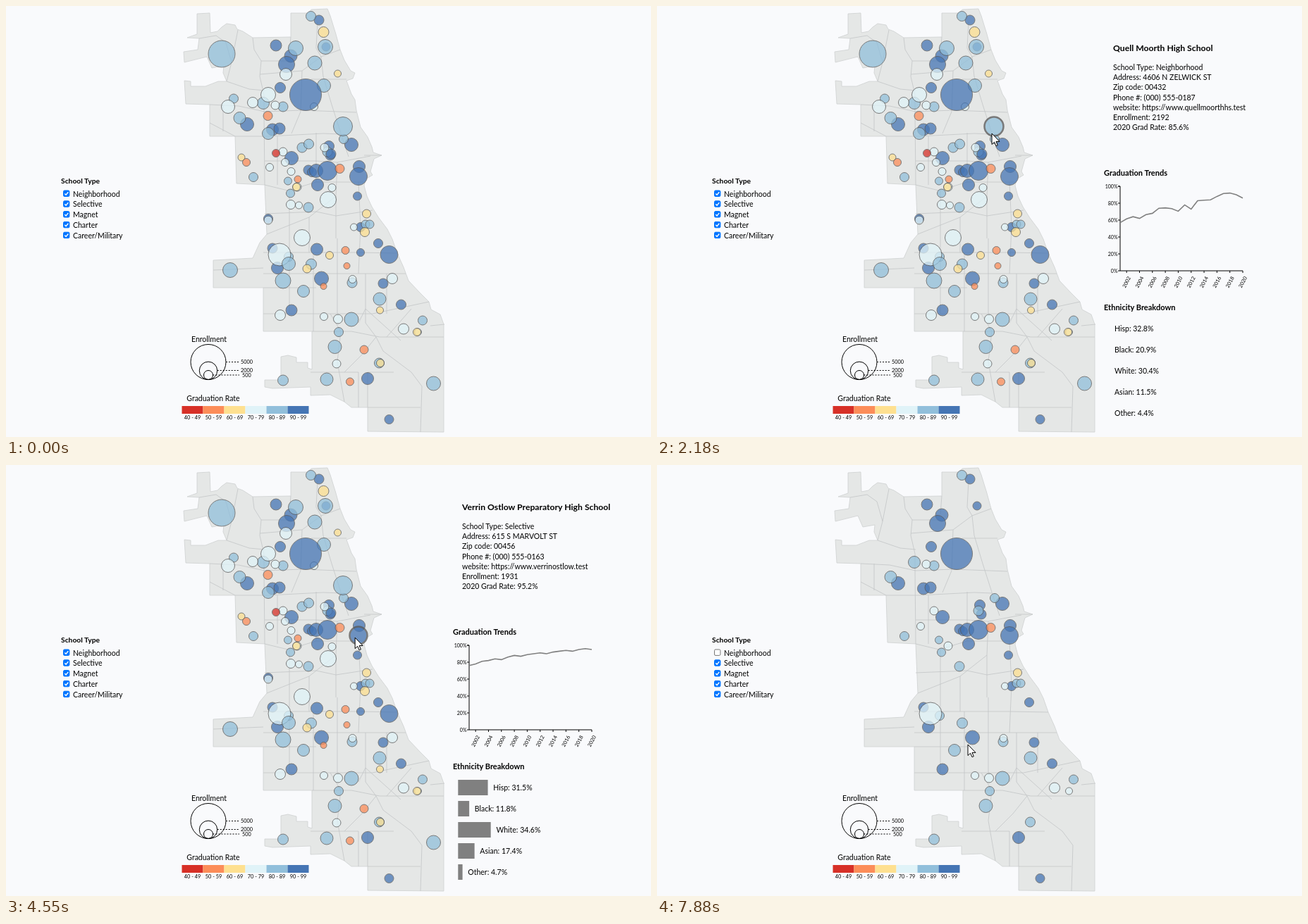
These frames come from a looping animation (915 by 612 pixels, 8 s). An HTML page:

```html
<!DOCTYPE html>
<html lang="en">
<head>
<meta charset="utf-8">
<title>School map</title>
<style>
html, body { margin: 0; width: 100%; height: 100%; overflow: hidden; background: #f9fafc; }
svg { display: block; width: 100%; height: 100%; font: 10.5px Lato, sans-serif; fill: #000; }
.land { fill: #e5e7e6; stroke: #cfd1d1; stroke-width: .8; }
.areas { fill: none; stroke: #c3c6c7; stroke-width: .8; }
.school { stroke: #555; stroke-width: 1; }
.line { fill: none; stroke: #000; }
.b { font-weight: 700; }
.tiny { font-size: 7.3px; }
</style>
</head>
<body>
<svg id="stage" viewBox="0 0 915 612">
  <path class="land" d="M271,11 289,10 290,38 300,36 306,30 313,25 325,27 328,33 336,36 350,45 404,44V10H429L433,5 456,4 460,14 468,40 474,62 480,77 489,92 495,95 492,103 483,106 490,125 495,133 497,148 503,172 513,186 519,200 521,208 533,212 522,217 517,235 520,240 510,246 508,255 512,270 519,285 529,301 541,317 548,331 555,351 564,371 571,390 587,407 600,420 603,431 616,438 621,452V605L513,604V570H490L480,562 460,552 432,553V541L378,543 367,541V531H390V498L400,496 412,499V506H428V514L434,516V462H365V400H294V361L350,358 360,336 370,324 367,254 327,252 325,185H289V140L255,139 253,106 262,107V114H283L301,107H313L308,95 309,85 292,88 285,72 253,80 252,65 272,62 274,46 257,45 271,40Z"/>
  <g class="areas" id="areas"></g>
  <g id="schools"></g>
  <g id="filters"></g>
  <g id="legend"></g>
  <g id="panel"></g>
  <path id="cursor" d="M0,0V15.5L3.6,12.2 6,17.7 8.3,16.7 6,11.4H11Z" fill="#fff" stroke="#000"/>
</svg>
<script>
const NS = 'http://www.w3.org/2000/svg', LOOP = 8000;
const $ = id => document.getElementById(id);

function add(parent, tag, attrs = {}, text) {
  const el = document.createElementNS(NS, tag);
  for (const k in attrs) el.setAttribute(k, attrs[k]);
  if (text !== undefined) el.textContent = text;
  return parent.appendChild(el);
}
const label = (g, x, y, text, more = {}) => add(g, 'text', { x, y, ...more }, text);
const clamp = v => Math.max(0, Math.min(1, v));
const cubic = v => (v = clamp(v)) < .5 ? 4 * v ** 3 : 1 - (2 - 2 * v) ** 3 / 2;
const smooth = v => v * v * (3 - 2 * v);

// Community borders
[
  'M350,45 352,62 362,78 360,100 366,126V150L367,254', 'M404,44 402,70', 'M329,34 320,80 313,107 345,118 367,120',
  'M274,46 298,42 312,52 320,80', 'M360,97 420,92 447,72 474,62', 'M442,22 440,60 447,72 450,100 462,140 478,190 486,214',
  'M289,140 330,142 367,150 420,148 497,151', 'M325,185H372L450,181 475,182', 'M308,140V178', 'M289,166 325,185',
  'M420,92 418,150 405,181', 'M433,104H483', 'M362,78H402', 'M367,220H440L470,222 517,213', 'M440,180V250', 'M385,185V254',
  'M367,254 400,262 440,250 508,250', 'M470,222 468,270V330', 'M367,295 440,292 468,298 520,290', 'M370,324 430,300 468,270',
  'M402,262V380', 'M430,300V350', 'M365,350H500L555,351', 'M500,250 503,312 500,380', 'M470,330V437', 'M365,380H567',
  'M294,375 365,372', 'M365,400H440', 'M402,380V437', 'M436,350V462', 'M365,437H520L600,420', 'M510,380V450', 'M540,380V437',
  'M434,462H490L530,470H621', 'M460,437 475,462 470,505 480,562', 'M510,450 525,470 535,490 575,520 590,540 588,605',
  'M432,520H500V570', 'M513,570H588', 'M513,570V520H550', 'M540,470 575,430', 'M500,450 510,430 560,475',
  'M480,520 505,495 525,470', 'M602,454 622,452', 'M508,212H533'
].forEach(d => add($('areas'), 'path', { d }));

// Schools: x, y, radius triples by graduation rate
const RATE = { red: '#d73027', orange: '#fc8d59', yellow: '#fee090', pale: '#e0f3f8', light: '#91bfdb', navy: '#4575b4' };
const citywide = {
  navy: [444,20,7, 383,56,8, 404,71,9, 398,83,11.5, 454,58,6, 389,116,7.5, 342,168,9.5, 378,175.5,8.5, 388,174,8,
    458,199,7.5, 490,197,9.5, 460,212,7, 405,216,9.5, 429,233,7, 434,236,6.5, 440,234,9.5, 456,234,13.5, 442,254,8.5,
    501,228,8.5, 500,242,12.5, 498.5,270,6, 503,314,6.5, 528,337,6.5, 378,344,7, 385,372,8.5, 447.5,387,10, 535,394,7,
    560.5,424,7, 405,432,8, 513,529,8.5, 543.5,587,6.5],
  light: [432.5,14.5,7, 365,138,8.5, 393,143,7, 331.5,159,8.5, 479,189,6.5, 456,207,7, 351,243,6.5, 400,248.5,5.5,
    403.5,266,6, 429,286,7, 510,310,6, 516,310,6, 401,356,6.5, 433,366.5,7.5, 422,405,8.5, 491,393,7, 530,416,9,
    490,445,10, 591,446.5,6.5, 472,463,6.5, 466.5,484,9.5, 529.5,507,7, 393,531.5,7.5],
  pale: [382,141,6, 393,207,6, 374,229,5.5, 413,257,6, 493.5,314,5, 388,353,16, 491.5,388,5.5, 451,441,5.5,
    471,444.5,6.5, 564,458.5,7.5, 584.5,463,5],
  yellow: [511.5,295,6], orange: [473.5,231,6.5]
};
const neighborhood = {
  light: [306,68,19, 411,60,10.5, 453,58,10.5, 438,81,10, 451,113,9.5, 323,131.5,6.5, 478,171,13.5, 372,181,8.5,
    420,201,7, 429.5,196,7, 318,375,10.5, 401,366,9.5, 393,390,11, 455,530,9, 606.5,536,10],
  navy: [461,210,7, 372,302,6.5, 441,345.5,8.5, 503,350,5.5, 543.5,353,12.5],
  pale: [397,97,8.5, 372,126,10.5, 315,143,9.5, 350,137,7.5, 437,143,5.5, 452,201,6, 396,222,5.5, 404.5,235,5.5,
    462.5,258,5.5, 457,275,11.5, 404,282,6.5, 415.5,283,5, 372,304,6, 420,329,11.5, 548,387,7.5, 389,439,7.5, 469,508,6],
  yellow: [450.5,37,7.5, 470.5,96,5, 334,215,5, 412,257,5.5, 509,321,6.5, 459,354,5.5, 427,373,6, 530.5,432,5,
    583,463,5.5, 531,507,5.5],
  orange: [371.5,156,6.5, 341,222,5.5, 414,246,5, 481.5,347,5.5, 483.5,369,4.5, 450.5,398,4.5, 508,488,6, 488,533.5,5.5],
  red: [383,209,5.5]
};
function plot(groups) {
  const dots = [];
  for (const rate in groups) {
    const list = groups[rate];
    for (let i = 0; i < list.length; i += 3) {
      const [x, y, r] = list.slice(i, i + 3);
      const el = add($('schools'), 'circle', { class: 'school', cx: x, cy: y, r, fill: RATE[rate], opacity: .75 });
      dots.push({ x, y, r, el });
    }
  }
  return dots;
}
const fixed = plot(citywide), locals = plot(neighborhood);
const dots = [...fixed, ...locals, ...plot({ navy: [425, 126, 22.5] })];

// Filters
const filters = $('filters');
label(filters, 78, 252, 'School Type', { class: 'b', 'font-size': 10.3 });
const boxes = ['Neighborhood', 'Selective', 'Magnet', 'Charter', 'Career/Military'].map((name, i) => {
  const y = 262 + i * 14.8;
  label(filters, 95, y + 8.6, name);
  const box = add(filters, 'rect', { x: 81.5, y: y, width: 8.4, height: 8.4, rx: 1.5, fill: '#0075ff', stroke: '#0075ff' });
  const tick = add(filters, 'path', { d: `M83.3,${y + 4.4}l1.8,1.9 3.2,-4`, fill: 'none', stroke: '#fff', 'stroke-width': 1.4 });
  return { box, tick };
});

// Legends
const legend = $('legend');
label(legend, 288, 477, 'Enrollment', { 'text-anchor': 'middle' });
[[25, 5000, 333, 505.5], [12.7, 2000, 333, 517.5], [6.5, 500, 335, 524]].forEach(([r, n, x, y]) => {
  add(legend, 'circle', { class: 'line', cx: 287, cy: 530.5 - r, r });
  add(legend, 'path', { class: 'line', d: `M${287 + r},${y}H331`, 'stroke-dasharray': '2 2' });
  label(legend, x, y + 2.6, n, { class: 'tiny' });
});
label(legend, 294, 561, 'Graduation Rate', { 'text-anchor': 'middle' });
Object.values(RATE).forEach((fill, i) => {
  add(legend, 'rect', { x: 249.5 + 30 * i, y: 568, width: 30, height: 11, fill });
  label(legend, 264.5 + 30 * i, 587, `${40 + 10 * i} - ${49 + 10 * i}`, { class: 'tiny', 'text-anchor': 'middle' });
});

// Detail panel
const schools = [
  { name: 'Osbert V Dorn Technical High School',
    info: ['Selective', '3718 W TELVORN ST', '00417', '(000) 555-0142', 'https://dornvoc.test', 4500, '96.9%'],
    trend: [86.5, 82.5, 82.5, 83, 84, 86, 92, 89, 93, 92.5, 92.5, 91.5, 93.5, 96, 95.5, 96.5, 96.2, 97.3, 97, 97],
    mix: [38.7, 7.5, 39.3, 10.3, 4.2] },
  { name: 'Quell Moorth High School',
    info: ['Neighborhood', '4606 N ZELWICK ST', '00432', '(000) 555-0187', 'https://www.quellmoorthhs.test', 2192, '85.6%'],
    trend: [57, 61.5, 64, 62, 66.5, 68, 74, 74.5, 73.5, 70.5, 78, 73, 83, 83.5, 84, 88, 91.5, 92, 90, 86],
    mix: [32.8, 20.9, 30.4, 11.5, 4.4] },
  { name: 'Verrin Ostlow Preparatory High School',
    info: ['Selective', '615 S MARVOLT ST', '00456', '(000) 555-0163', 'https://www.verrinostlow.test', 1931, '95.2%'],
    trend: [76, 78, 81, 82, 84, 83, 86, 88, 87, 89, 90, 91, 90, 92, 93, 94, 93, 95, 96, 95],
    mix: [31.5, 11.8, 34.6, 17.4, 4.7] },
  { name: 'Tamsel Corvane Academy High School',
    info: ['Charter', '5209 S DRELLING AVE', '00471', '(000) 555-0119', 'https://tamselcorvane.test', 842, '91.4%'],
    trend: [62, 64, 63, 67, 69, 72, 71, 75, 78, 77, 80, 82, 83, 85, 84, 87, 89, 90, 92, 91],
    mix: [82.1, 12.6, 3.2, .8, 1.3] }
];
const FIELDS = ['School Type', 'Address', 'Zip code', 'Phone #', 'website', 'Enrollment', '2020 Grad Rate'];
const GROUPS = ['Hisp', 'Black', 'White', 'Asian', 'Other'];
const panel = $('panel');
const yearX = i => 657 + i * 174 / 19, rateY = p => 376 - p * 1.2;
const title = label(panel, 647, 63.5, '', { class: 'b', 'font-size': 12.2 });
const info = FIELDS.map((_, i) => label(panel, 647, 91 + i * 14.2, ''));
label(panel, 634, 240.5, 'Graduation Trends', { class: 'b', 'font-size': 11 });
label(panel, 634, 431.5, 'Ethnicity Breakdown', { class: 'b', 'font-size': 11 });
add(panel, 'path', { class: 'line', d: 'M654,256H657V376H831' });
for (let p = 0; p <= 100; p += 20) {
  add(panel, 'path', { class: 'line', d: `M654,${rateY(p)}h3` });
  label(panel, 653.5, rateY(p) + 2.5, p + '%', { 'font-size': 7, 'text-anchor': 'end' });
}
for (let i = 1; i < 20; i += 2) {
  add(panel, 'path', { class: 'line', d: `M${yearX(i)},376v3` });
  label(panel, 0, 2.5, 2001 + i, { class: 'tiny', 'text-anchor': 'middle', transform: `translate(${yearX(i)} 392) rotate(-62)` });
}
const trend = add(panel, 'path', { fill: 'none', stroke: '#808080', 'stroke-width': 1.6 });
const bars = GROUPS.map((_, i) => ({
  rect: add(panel, 'rect', { x: 641.3, y: 447 + 30 * i, height: 22, fill: '#808080' }),
  text: label(panel, 649, 462 + 30 * i, '')
}));

let shown = -1;
function fillPanel(n) {
  if (n === shown) return;
  shown = n;
  const s = schools[n];
  title.textContent = s.name;
  info.forEach((el, i) => el.textContent = `${FIELDS[i]}: ${s.info[i]}`);
  trend.setAttribute('d', 'M' + s.trend.map((p, i) => `${yearX(i)},${rateY(p)}`).join(' '));
  bars.forEach((b, i) => b.text.textContent = `${GROUPS[i]}: ${s.mix[i]}%`);
}

// Timeline (ms)
const hovers = [
  { from: 600, to: 2060, grow: 655, x: 425, y: 126 },
  { from: 2160, to: 4060, grow: 2415, x: 478, y: 171 },
  { from: 4190, to: 5600, grow: 4200, x: 500, y: 242 },
  { from: 7690, to: 7740, grow: 7690, x: 385, y: 372 }
];
hovers.forEach(h => h.dot = dots.find(d => d.x === h.x && d.y === h.y));
const moves = [
  [30, 560, 300], [600, 430, 135], [820, 418, 128], [2030, 418, 128], [2180, 475, 181], [2790, 476, 176], [4010, 476, 176],
  [4140, 488, 238], [4200, 492, 242], [4700, 496, 246], [5580, 496, 246], [5620, 464, 246], [6410, 97, 270], [6600, 87, 268],
  [7270, 87, 268], [7880, 441, 397], [LOOP, 441, 397]
];
const UNCHECK = 6952;

function pointer(t) {
  const i = moves.findIndex(m => m[0] > t);
  const [t0, x0, y0] = moves[i - 1], [t1, x1, y1] = moves[i];
  const k = smooth((t - t0) / (t1 - t0));
  return [x0 + (x1 - x0) * k, y0 + (y1 - y0) * k];
}

function render(t) {
  const inside = t >= 30;
  $('cursor').style.display = inside ? '' : 'none';
  if (inside) $('cursor').setAttribute('transform', `translate(${pointer(t)})`);

  const active = hovers.findIndex(h => t >= h.from && t < h.to);
  hovers.forEach((h, i) => h.dot.el.style.strokeWidth = i === active ? 2.5 : 1);
  panel.style.display = active < 0 ? 'none' : '';
  if (active >= 0) {
    fillPanel(active);
    const k = cubic((t - hovers[active].grow) / 500);
    bars.forEach((b, i) => {
      const w = schools[active].mix[i] * 1.5 * k;
      b.rect.setAttribute('width', w);
      b.text.setAttribute('x', 649 + w);
    });
  }

  const off = t >= UNCHECK, keep = 1 - cubic((t - UNCHECK) / 250);
  boxes[0].box.setAttribute('fill', off ? '#fff' : '#0075ff');
  boxes[0].box.setAttribute('stroke', off ? '#767676' : '#0075ff');
  boxes[0].tick.style.display = off ? 'none' : '';
  locals.forEach(d => {
    d.el.setAttribute('r', d.r * keep);
    d.el.setAttribute('opacity', .75 * keep);
  });
}

const start = performance.now();
function loop() {
  render((performance.now() - start) % LOOP);
  requestAnimationFrame(loop);
}
loop();
</script>
</body>
</html>
```
